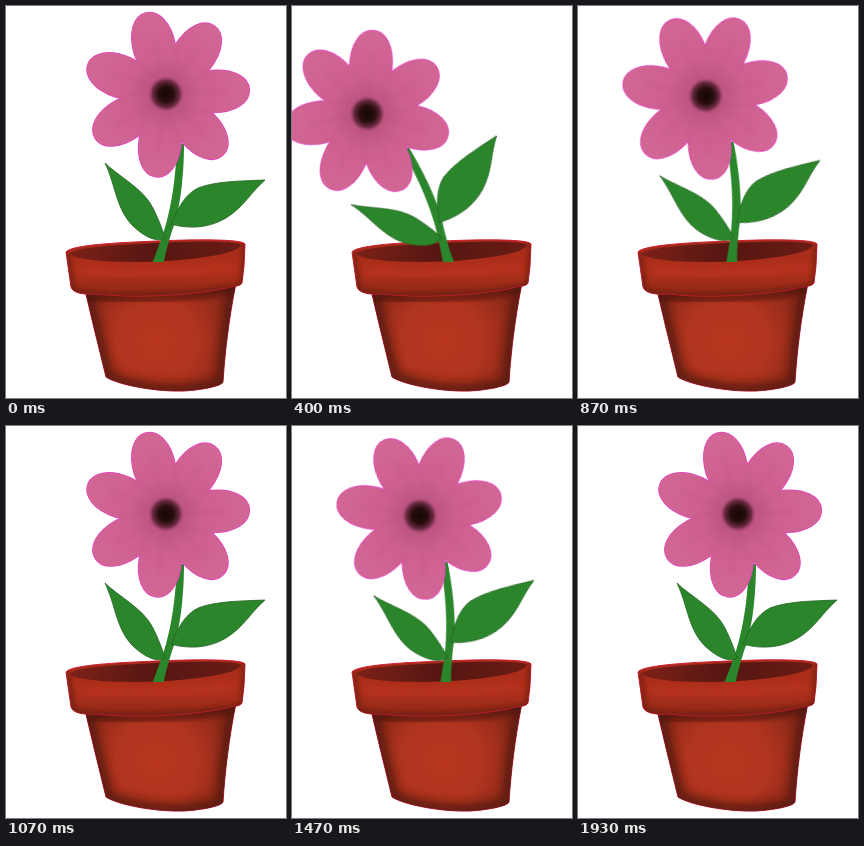
An HTML page that plays this animation: 280 by 392 pixels, repeating every 1990 ms.

```html
<!DOCTYPE html>
<html lang="en">
<head>
<meta charset="utf-8">
<title>Swaying flower</title>
<style>
html, body { margin: 0; width: 100%; height: 100%; overflow: hidden; background: #fff; }
svg { display: block; width: 280px; height: 392px; }
#plant { transform-origin: 153px 249px; }
</style>
</head>
<body>
<svg viewBox="0 0 280 392">
  <defs>
    <radialGradient id="clay" gradientUnits="userSpaceOnUse" cx="150" cy="335" r="76">
      <stop offset="0" stop-color="#b8361f"/>
      <stop offset=".55" stop-color="#b0341e"/>
      <stop offset="1" stop-color="#8c2a1a"/>
    </radialGradient>
    <linearGradient id="lip" x1="0" y1="0" x2="0" y2="1">
      <stop offset="0" stop-color="#a42a18"/>
      <stop offset=".55" stop-color="#b0301b"/>
      <stop offset="1" stop-color="#8f2817"/>
    </linearGradient>
    <linearGradient id="soil" x1="0" x2="1">
      <stop offset="0" stop-color="#7c2118"/>
      <stop offset=".5" stop-color="#561612"/>
      <stop offset="1" stop-color="#6a1c14"/>
    </linearGradient>
    <radialGradient id="blush" gradientUnits="userSpaceOnUse" cx="0" cy="0" r="84">
      <stop offset=".1" stop-color="#b8527c"/>
      <stop offset=".45" stop-color="#cd608f"/>
      <stop offset="1" stop-color="#d26694"/>
    </radialGradient>
    <radialGradient id="eye">
      <stop offset="0" stop-color="#140605"/>
      <stop offset=".45" stop-color="#2a0e0e"/>
      <stop offset=".75" stop-color="#552033" stop-opacity=".8"/>
      <stop offset="1" stop-color="#a04468" stop-opacity="0"/>
    </radialGradient>
    <filter id="soft" x="-20%" y="-20%" width="140%" height="140%"><feGaussianBlur stdDeviation="5"/></filter>
    <filter id="fine" x="-20%" y="-20%" width="140%" height="140%"><feGaussianBlur stdDeviation="2"/></filter>
    <path id="body" d="M79 284L88 322L100 371C112 379 150 386 178 385C196 384 216 380 217 376C219 345 223 312 230 277Z"/>
    <path id="rim" d="M60 246C64 240 100 237 140 235.500C190 233 236 233 239 238L238 260L236 277C234 281 226 280 220 282C195 288 130 293 92 288C76 289 67 287 65 281Z"/>
    <path id="petal" d="M0 0C14 -10 26 -19 46 -21C68 -22 83.500 -13 83.500 0C83.500 13 68 22 46 21C26 19 14 10 0 0Z"/>
    <clipPath id="inBody"><use href="#body"/></clipPath>
    <clipPath id="inRim"><use href="#rim"/></clipPath>
    <clipPath id="aboveSoil"><path d="M0 0H280V256H0Z"/></clipPath>
  </defs>

  <g id="pot">
    <use href="#body" fill="url(#clay)" stroke="#c01838" stroke-width="1"/>
    <g clip-path="url(#inBody)">
      <use href="#body" fill="none" stroke="#4a1810" stroke-width="15" opacity=".72" filter="url(#soft)"/>
      <path d="M74 288C120 297 190 293 234 281" fill="none" stroke="#4e170f" stroke-width="9" opacity=".5" filter="url(#fine)"/>
    </g>
    <use href="#rim" fill="url(#lip)" stroke="#d01c34" stroke-width="1"/>
    <g clip-path="url(#inRim)">
      <path d="M62 247L67 284C90 292 190 290 236 279L239 238" fill="none" stroke="#5c1a10" stroke-width="5" opacity=".6" filter="url(#fine)"/>
      <path d="M76 266C120 272 190 268 228 258" fill="none" stroke="#bd3820" stroke-width="9" opacity=".6" filter="url(#soft)"/>
    </g>
    <path d="M63 248C70 241 110 239 150 237C195 235 232 235 235 239C233 246 205 252 160 255C120 257 74 256 63 248Z" fill="url(#soil)"/>
  </g>

  <g clip-path="url(#aboveSoil)">
    <g id="plant">
      <g fill="#2b852b" stroke="#236323" stroke-width=".8">
        <path d="M171 138L178 138C178 170 174 205 166 225C163 235 158 250 156 268L142 268C149 250 158 228 162 210C167 190 170 165 171 138Z" stroke="none"/>
        <path d="M99 157C112 170 138 183 147 202C152 212 156 222 159 232C150 237 138 230 128 221C110 204 110 180 99 157Z"/>
        <path d="M259 174C235 175 210 175 192 182C178 189 172 203 165 218C178 222 200 224 220 212C238 201 244 187 259 174Z"/>
      </g>
      <g transform="translate(160 88)">
        <g id="edge" fill="none" stroke="#e83cc8" stroke-width="1.500"></g>
        <g id="petals" fill="url(#blush)"></g>
        <g id="folds" fill="none" stroke="#b24c78" stroke-width="2" opacity=".28" filter="url(#fine)"></g>
        <circle r="18" fill="url(#eye)"/>
      </g>
    </g>
  </g>
</svg>
<script>
const NS = 'http://www.w3.org/2000/svg';
const LOOP = 1990;
const petalAngles = [-104, -54.5, -3, 47, 97, 148, 201];

function add(parent, tag, attrs) {
  const el = document.createElementNS(NS, tag);
  for (const key in attrs) el.setAttribute(key, attrs[key]);
  document.getElementById(parent).append(el);
}

for (const angle of petalAngles) {
  const transform = `rotate(${angle})`;
  add('edge', 'use', { href: '#petal', transform });
  add('petals', 'use', { href: '#petal', transform });
  add('folds', 'path', { d: 'M12 0L60 1M10 8C22 17 32 19 44 20', transform });
}

// Sway poses in degrees, held until the next start time.
const right = 0, middle = -11.5, left = -22.7, farLeft = -31.3;
const sway = [
  [0, right], [200, left], [400, farLeft], [670, left], [870, middle],
  [1070, right], [1470, middle], [1670, left], [1870, middle], [1930, right], [LOOP, right]
];

document.getElementById('plant').animate(
  sway.map(([time, angle]) => ({
    offset: time / LOOP,
    transform: `rotate(${angle}deg)`,
    easing: 'steps(1, end)'
  })),
  { duration: LOOP, iterations: Infinity }
);
</script>
</body>
</html>
```
